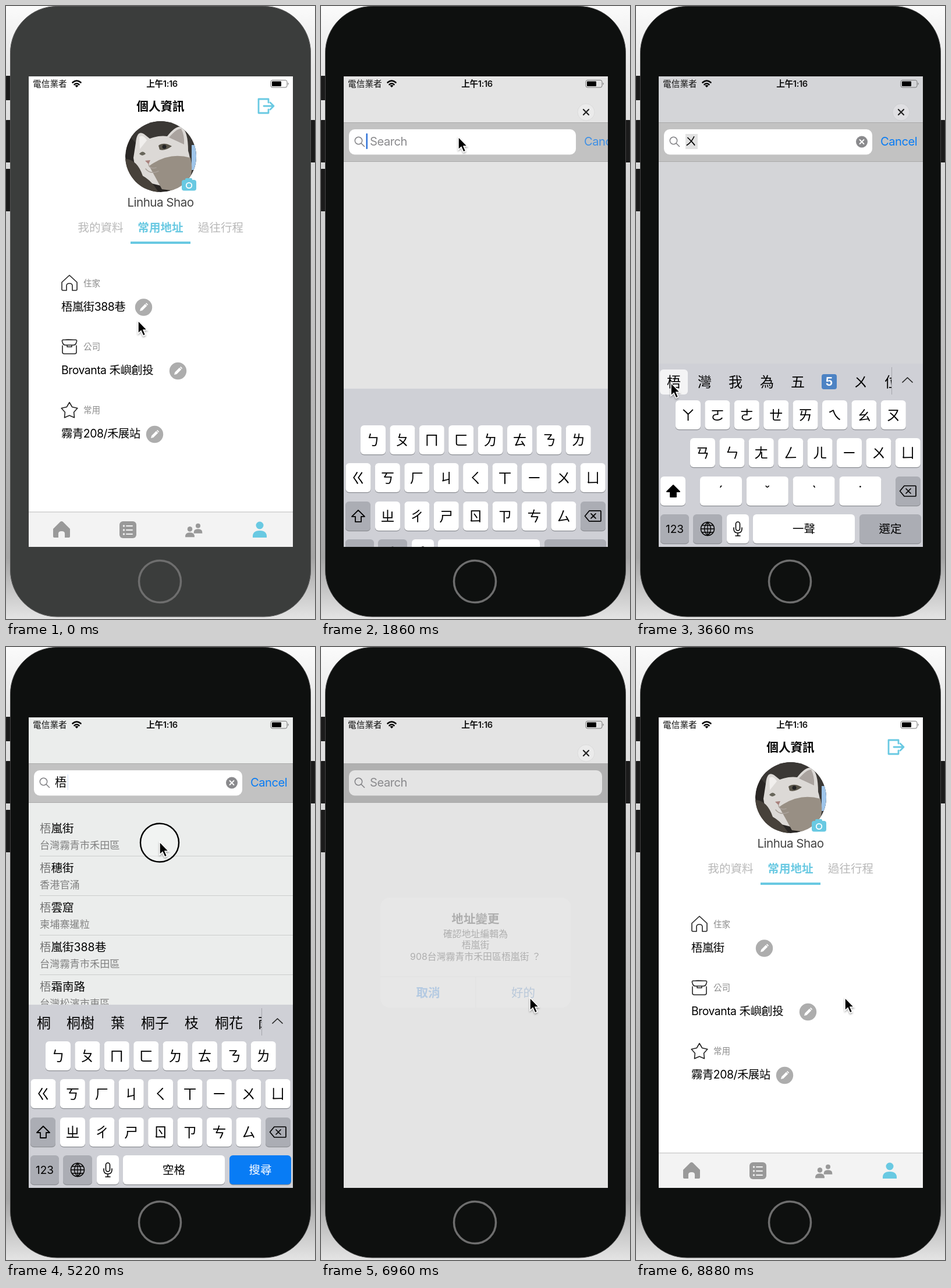
Recreate the animation shown at these times as an HTML page. Size 531 px wide and 1054 px high, loop 8.94 s.

```html
<!DOCTYPE html>
<html lang="zh-Hant">
<head>
<meta charset="utf-8">
<style>
html, body { margin: 0; width: 100%; height: 100%; overflow: hidden; background: #eee; }
svg { display: block; width: 100vw; height: 100vh; }
text { font-family: Inter, "Noto Sans CJK TC", "Noto Sans CJK", sans-serif; white-space: pre; }
.latin { letter-spacing: -.025em; }
</style>
</head>
<body>
<svg id="stage" viewBox="0 0 531 1054" preserveAspectRatio="none"></svg>
<script>
const LOOP = 8940;
const BLUE = '#69c9e2', LINK = '#087cf5';

const rect = (x, y, w, h, fill, r = 0, extra = '') =>
  `<rect x="${x}" y="${y}" width="${w}" height="${h}" rx="${r}" fill="${fill}" ${extra}/>`;
const circle = (x, y, r, fill, extra = '') => `<circle cx="${x}" cy="${y}" r="${r}" fill="${fill}" ${extra}/>`;
const path = (d, stroke, w = 2, fill = 'none', extra = '') =>
  `<path d="${d}" stroke="${stroke}" stroke-width="${w}" fill="${fill}" stroke-linecap="round" stroke-linejoin="round" ${extra}/>`;
const shape = (d, fill, extra = '') => `<path d="${d}" fill="${fill}" ${extra}/>`;
const text = (x, y, s, size, fill = '#000', extra = '') =>
  `<text x="${x}" y="${y}" font-size="${size}" fill="${fill}" ${extra}>${s}</text>`;
const mid = (x, y, s, size, fill, extra = '') => text(x, y, s, size, fill, `text-anchor="middle" ${extra}`);
const group = (id, body, extra = '') => `<g id="${id}" ${extra}>${body}</g>`;

function phone() {
  const side = (x, y, h) => rect(x, y, 10, h, '#1b1b1b', 2);
  return rect(0, 0, 531, 1054, 'url(#backdrop)') +
    side(-1, 120, 42) + side(-1, 196, 73) + side(-1, 280, 73) + side(522, 196, 73) +
    rect(7.5, .5, 516, 1049.5, '#0e100f', 80, 'stroke="#444"') +
    rect(7.5, .5, 516, 1049.5, '#fff', 80, 'id="glare"') +
    circle(264.5, 989.5, 36, 'none', 'stroke="#6e6e6e" stroke-width="3.5"');
}

function statusBar() {
  return text(46, 139, '電信業者', 14.7, '#111') +
    path('M114.5 131.5Q121.5 125.5 128.5 131.5M117.5 135Q121.5 131.5 125.5 135', '#000', 2.6) +
    shape('M118.6 137Q121.5 134.7 124.4 137L121.5 140Z', '#000') +
    mid(268, 139, '上午1:16', 14.7, '#111', 'font-weight="600" class="latin"') +
    rect(455, 127.5, 28, 12.5, 'none', 3, 'stroke="#777"') + rect(457, 129.5, 16, 8.5, '#000', 1) +
    shape('M484.5 131.5Q487 133.7 484.5 136Z', '#777');
}

function avatar() {
  return group('', circle(266, 259, 61, '#292624') +
    shape('M204 215L240 196L300 200L329 235V320H300Z', '#3b3835') +
    shape('M319 239H328V282H319Z', '#9fc5ea') +
    shape('M223 235Q225 213 237 220L247 228Q263 222 277 224Q292 205 302 208Q313 216 313 249Q326 290 302 318L246 304Q222 288 219 261Z', '#dcd9d6') +
    shape('M280 226Q294 210 301 211Q307 222 306 238Z', '#aaa39f') +
    shape('M229 225Q236 220 242 231L230 246Z', '#f1efed') +
    shape('M246 275Q280 250 317 261Q326 295 300 319L268 315Z', '#988f84') +
    shape('M204 263Q225 263 235 292Q250 300 262 320H222Q204 302 204 263Z', '#47413a') +
    shape('M262 240Q271 233 285 241Q273 250 264 247Z', '#5a554a') + circle(272, 242, 3.5, '#222') +
    shape('M229 254Q235 247 240 254Q234 260 229 254Z', '#68665b') +
    shape('M239 266L248 265L245 272Z', '#a8827d') +
    path('M245 272Q246 281 258 278M240 280Q248 290 262 284', '#aaa29b', 1.5), 'clip-path="url(#round)"') +
    rect(302, 299, 25, 18.5, BLUE, 4) + rect(308, 296, 12, 7, BLUE, 2) +
    circle(314.5, 308.5, 4.7, 'none', 'stroke="#fff" stroke-width="1.8"');
}

const pencil = (id, x, y) => group(id, circle(0, 0, 14.7, '#adadad') +
  shape('M-6.5 6.5L-5.3 2.2L2.6 -5.7L5.8 -2.5L-2.2 5.4ZM3.4 -6.5L4.8 -7.5L7.5 -4.8L6.5 -3.3Z', '#fff'),
  `transform="translate(${x} ${y})"`);

function profile() {
  const person = (x, y, k, fill) => `<g transform="translate(${x} ${y}) scale(${k})">` +
    circle(0, -7, 6.5, fill) + shape('M-12 14Q-13 2 0 2Q13 2 12 14Z', fill) + '</g>';
  const dots = [894, 901, 908].map(y =>
    circle(202.5, y, 1.7, '#f2f2f2') + path(`M207 ${y}H217`, '#f2f2f2', 2)).join('');
  const star = Array.from({ length: 10 }, (_, i) => {
    const a = i * Math.PI / 5, r = i % 2 ? 8 : 14.5;
    return `${(109 + r * Math.sin(a)).toFixed(1)} ${(696 - r * Math.cos(a)).toFixed(1)}`;
  }).join('L');
  return rect(39, 121, 454, 809, '#fff') +
    mid(265.5, 179.5, '個人資訊', 20.6, '#000', 'font-weight="700"') +
    path('M451 166V160H434V184H451V178M443 172H460M454 166L460 172L454 178', BLUE, 2.8) +
    avatar() +
    mid(265.5, 345, 'Linhua Shao', 20.6, '#444', 'class="latin"') +
    mid(162.5, 388, '我的資料', 19.6, '#b8b8b8') +
    mid(265.5, 388, '常用地址', 19.6, BLUE, 'font-weight="700"') +
    mid(369, 388, '過往行程', 19.6, '#b8b8b8') + rect(214, 405, 103, 4, BLUE) +
    path('M96 475L109 463L122 475V487Q122 489 120 489H114V481Q114 477 109 477Q104 477 104 481V489H98Q96 489 96 487Z', '#222', 1.6) +
    path('M97 578Q95 574 99 574H119Q123 574 121 578Q120 583 116 583H102Q98 583 97 578ZM102 574Q104 573 116 574M97 584V595Q97 598 100 598H118Q121 598 121 595V584M105 583V586H113V583', '#222', 1.6) +
    path(`M${star}Z`, '#222', 1.6) +
    text(133, 482, '住家', 14.6, '#8c8c8c') + text(133, 591, '公司', 14.6, '#8c8c8c') + text(133, 700, '常用', 14.6, '#8c8c8c') +
    text(95, 524, '', 19.4, '#000', 'id="home" class="latin"') + pencil('homePen', 236, 518) +
    text(95, 633, 'Brovanta 禾嶼創投', 19.4, '#000', 'class="latin"') + pencil('', 295.5, 627.5) +
    text(95, 742, '霧青208/禾展站', 19.4, '#000', 'class="latin"') + pencil('', 255.5, 736.5) +
    rect(39, 870, 454, 60, '#f3f3f3') + rect(39, 869.5, 454, 1, '#b9b9b9') +
    shape('M95.5 886Q97 886 98 887L110 899V912Q110 914 108 914H101V907Q101 903 95.5 903Q90 903 90 907V914H83Q81 914 81 912V899L93 887Q94 886 95.5 886Z', '#999') +
    rect(195, 886, 29, 29, '#999', 6) + dots +
    person(316, 904, .66, '#999') + person(330, 898, .62, '#999') + person(436, 900, 1, BLUE);
}

function results() {
  const rows = [['嵐街', '台灣霧青市禾田區'], ['穗街', '香港官涌'], ['雲窟', '柬埔寨暹粒'],
    ['嵐街388巷', '台灣霧青市禾田區'], ['霜南路', '台灣松濱市東區']];
  return rect(39, 121, 454, 809, '#ebedec') + rows.map(([name, area], i) => {
    const y = 291 + 68 * i;
    return text(58, y + 28, `<tspan fill="#777">梧</tspan>${name}`, 19.5) +
      text(58, y + 56, area, 17.2, '#808080') + rect(58, y + 68, 435, 1, '#cbcdcc');
  }).join('');
}

function searchBar() {
  return rect(39, 200, 454, 68, '#b0b0b0', 0, 'id="band"') +
    rect(39, 200, 454, 1, '#aaa') + rect(39, 267, 454, 1, '#aaa') +
    rect(48, 212, 435, 43.5, '#fff', 10, 'id="field"') +
    circle(64.5, 231.5, 6.2, 'none', 'stroke="#808084" stroke-width="1.5"') + path('M69 236L74.5 241.5', '#808084', 1.6) +
    rect(85, 220, 21, 26, '#e2e2e2', 0, 'id="mark"') +
    text(84, 240, 'Search', 20.2, '#8a8a8d', 'id="query" class="latin"') +
    rect(77.5, 219, 2.5, 27, '#2f72d8', 1, 'id="caret"') +
    group('clear', circle(388, 233.5, 10, '#8a8a8d') + path('M384.5 230L391.5 237M391.5 230L384.5 237', '#fff', 1.8)) +
    text(420, 240, 'Cancel', 20.2, LINK, 'id="cancel" class="latin"');
}

const keyBox = (x, y, w, fill) => rect(x, y + 1.3, w, 50, '#8d8f94', 6) + rect(x, y, w, 50, fill, 6);
const key = (x, y, w, label, fill = '#fff', size = 24, color = '#000') =>
  keyBox(x, y, w, fill) + mid(x + w / 2, y + 25 + size * .36, label, size, color);
const keyRow = (x, y, labels) => [...labels].map((c, i) => key(x + 50.4 * i, y, 43, c)).join('');

function keyboard() {
  const gray = '#abadb4';
  const arrow = fill => path('M64 824L75 835H69V844H59V835H53Z', '#000', 1.8, fill);
  const initials = keyRow(68, 678, 'ㄅㄆㄇㄈㄉㄊㄋㄌ') + keyRow(42.5, 743, 'ㄍㄎㄏㄐㄑㄒㄧㄨㄩ') +
    keyRow(93, 809, 'ㄓㄔㄕㄖㄗㄘㄙ') + keyBox(42, 809, 43, gray) + arrow('none') + key(201, 874, 175, '空格', '#fff', 19.5);
  const tones = [...'ˊˇˋ˙'].map((c, i) => key(110 + 79.8 * i, 809, 72, c)).join('');
  const finals = keyRow(68, 678, 'ㄚㄛㄜㄝㄞㄟㄠㄡ') + keyRow(93, 743, 'ㄢㄣㄤㄥㄦㄧㄨㄩ') + tones +
    keyBox(42, 809, 43, '#fff') + arrow('#000') + key(201, 874, 175, '一聲', '#fff', 19.5) + key(384, 874, 106, '選定', gray, 19.5);
  const words = list => list.map(([x, s]) => mid(x, 655, s, 24)).join('');
  const first = rect(41, 625, 48, 43, '#f4f4f5', 6) + words([[65, '梧'], [118, '灣'], [171, '我'], [225, '為'], [278, '五'], [386, 'ㄨ'], [439, '位']]) +
    rect(319, 633, 26, 26, '#4d83c4', 4) + mid(332, 653, '5', 20, '#fff', 'font-weight="700"');
  const next = words([[65, '桐'], [128, '桐樹'], [192, '葉'], [256, '桐子'], [319, '枝'], [383, '桐花'], [445, '雨']]);
  return rect(39, 615, 454, 330, '#cfd0d6') +
    group('', group('firstWords', first) + group('nextWords', next), 'clip-path="url(#words)"') +
    group('more', rect(439, 621, 1, 47, '#a5a6ac') + path('M458 647L466.5 639L475 647', '#222', 1.7)) +
    group('initials', initials) + group('finals', finals) +
    keyBox(446, 809, 43, gray) +
    path('M461 825H480Q481 825 481 826V842Q481 843 480 843H461L453.5 834ZM464 830L472 838M472 830L464 838', '#000', 1.7) +
    key(42, 874, 49, '123', gray, 19) + keyBox(98, 874, 50, gray) +
    circle(123, 899, 11.5, 'none', 'stroke="#000" stroke-width="1.5"') +
    path('M111.5 899H134.5M123 887.5V910.5M114 893H132M114 905H132M123 887.5Q112 899 123 910.5Q134 899 123 910.5M123 887.5Q134 899 123 910.5', '#000', 1.3) +
    keyBox(156, 874, 38, '#fff') + rect(171.5, 887, 7, 15, 'none', 3.5, 'stroke="#000" stroke-width="1.6"') +
    path('M168 897V899Q168 906 175 906Q182 906 182 899V897M175 906V911M171 911H179', '#000', 1.6) +
    group('searchOff', key(384, 874, 106, '搜尋', gray, 19.5)) +
    group('searchOn', key(384, 874, 106, '搜尋', LINK, 19.5, '#fff'));
}

function alertBox() {
  return rect(102, 431, 327.5, 189, '#f3f3f3', 16) +
    mid(265.5, 474.5, '地址變更', 20.6, '#000', 'font-weight="700"') +
    ['確認地址編輯為', '梧嵐街', '908台灣霧青市禾田區梧嵐街 ？'].map((s, i) => mid(265.5, 498.5 + 19.5 * i, s, 15.9)).join('') +
    rect(102, 566.5, 327.5, 1, '#d9d9d9') + rect(265.5, 567, 1, 53, '#d9d9d9') +
    mid(184, 601.5, '取消', 20.6, '#1976dc', 'font-weight="700"') + mid(347.5, 601.5, '好的', 20.6, '#2f70ba');
}

const stage = document.getElementById('stage');
stage.innerHTML = `<defs>
  <linearGradient id="backdrop" x2="0" y2="1"><stop stop-color="#fbfbfb"/><stop offset=".1" stop-color="#e6e6e6"/>
  <stop offset=".5" stop-color="#c4c4c4"/><stop offset=".9" stop-color="#a5a5a5"/><stop offset="1" stop-color="#e4e4e4"/></linearGradient>
  <clipPath id="screen">${rect(39, 121, 454, 809, '#000')}</clipPath>
  <clipPath id="round">${circle(266, 259, 61, '#000')}</clipPath>
  <clipPath id="words">${rect(39, 615, 400, 60, '#000')}</clipPath>
  <filter id="soft" x="-50%" y="-50%" width="200%" height="200%"><feDropShadow dx="0" dy="2" stdDeviation="1.5" flood-opacity=".35"/></filter>
  </defs>` + phone() + group('', profile() +
  group('modal', rect(39, 121, 454, 809, '#e4e4e4', 0, 'id="page"') +
    circle(455.5, 182.5, 14.5, '#fff', 'fill-opacity=".25" stroke="#000" stroke-opacity=".06"') +
    path('M451 178L460 187M460 178L451 187', '#222', 2.2) +
    group('results', results()) + searchBar() + group('keys', keyboard())) +
  rect(39, 121, 454, 809, '#000', 0, 'id="dim"') + group('alert', alertBox()) + statusBar(), 'clip-path="url(#screen)"') +
  group('ring', circle(0, 0, 33, '#fff', 'fill-opacity=".3" stroke="#000" stroke-width="2.4"')) +
  group('cursor', shape('M0 0V22L5 17.5L8.8 26L12.6 24.3L9 16H15.5Z', '#000', 'stroke="#fff" stroke-width="1.5" filter="url(#soft)"'));

const part = {};
stage.querySelectorAll('[id]').forEach(e => part[e.id] = e);
const set = (id, name, value) => part[id].setAttribute(name, value);
const fade = (id, value) => set(id, 'opacity', value);
const show = (id, on) => fade(id, on ? 1 : 0);
const move = (id, x, y) => set(id, 'transform', `translate(${x} ${y})`);

const ramp = (t, a, b) => Math.min(1, Math.max(0, (t - a) / (b - a)));
const ease = u => (1 - Math.cos(Math.PI * u)) / 2;
const mix = (a, b, u) => a + (b - a) * u;
const spring = ms => { const w = Math.max(0, ms) * .0183; return 1 - (1 + w) * Math.exp(-w); };
const blend = (a, b, u) => `rgb(${a.map((v, i) => Math.round(mix(v, b[i], u)))})`;

// [start, end, x, y] of each pointer move
const MOVES = [[60, 200, 232, 531], [1050, 1260, 240, 208], [1400, 1580, 236, 225], [2290, 2720, 417, 769],
  [3220, 3600, 60, 648], [4880, 5160, 264, 335], [5520, 6100, 345, 522], [6240, 6460, 359, 603]];
const TAPS = [[220, 360], [1600, 1720], [2780, 2900], [3700, 3840], [5160, 5300], [6520, 6640]];

function pointer(t) {
  let x = 227, y = 541;
  for (const [a, b, nx, ny] of MOVES) {
    const u = ease(ramp(t, a, b));
    x = mix(x, nx, u);
    y = mix(y, ny, u);
  }
  return [x, y];
}

function draw(t) {
  const [x, y] = pointer(t);
  move('cursor', x, y);
  move('ring', x, y + 1.5);
  show('ring', TAPS.some(([a, b]) => t >= a && t < b));
  fade('glare', .19 * (1 - ramp(t, 0, 360)));

  const renamed = t > 6700;
  part.home.textContent = renamed ? '梧嵐街' : '梧嵐街388巷';
  move('homePen', renamed ? 220.5 : 236.5, 518);

  move('modal', 0, 809 * (1 - spring(t - 380) + spring(t - 7060)));

  const focus = ease(ramp(t, 1670, 2015)) - ease(ramp(t, 5340, 5640));
  const bright = ramp(t, 1640, 1760) - ramp(t, 5340, 5640);
  const dimmed = ramp(t, 1860, 2060) - ramp(t, 5340, 5500);
  set('page', 'fill', blend([228, 228, 228], [212, 213, 216], dimmed));
  set('band', 'fill', blend([176, 176, 176], [194, 194, 194], bright));
  set('field', 'fill', blend([228, 228, 228], [255, 255, 255], bright));
  set('field', 'width', 435 - 77 * focus);
  set('cancel', 'x', 497 - 77 * focus);
  fade('cancel', Math.min(1, focus * 1.2));

  const composing = t >= 2860 && t < 3780, chosen = t >= 3780 && t < 5340, typed = composing || chosen;
  part.query.textContent = composing ? 'ㄨ' : chosen ? '梧' : 'Search';
  set('query', 'fill', typed ? '#000' : '#8a8a8d');
  show('mark', composing);
  show('clear', typed);
  set('caret', 'x', chosen ? 105 : 77.5);
  fade('caret', composing || t < 1640 || t >= 5340 ? 0 : chosen ? .12 : 1);

  move('keys', 0, 315 * (1 - spring(t - 1670) + spring(t - 5340)));
  show('firstWords', composing);
  show('nextWords', t >= 3780);
  show('more', t >= 2860);
  show('finals', composing);
  show('initials', !composing);
  show('searchOff', t < 2860);
  show('searchOn', t >= 3780);
  fade('results', ramp(t, 4260, 4380) - ramp(t, 5340, 5480));

  const appear = ease(ramp(t, 5700, 5960));
  fade('dim', .355 * (appear - ramp(t, 6680, 6920)));
  fade('alert', appear - ramp(t, 6700, 7040));
  const k = 1.15 - .15 * appear;
  set('alert', 'transform', `translate(${265.5 * (1 - k)} ${525.5 * (1 - k)}) scale(${k})`);
}

const start = performance.now();
function tick() {
  draw((performance.now() - start) % LOOP);
  requestAnimationFrame(tick);
}
tick();
</script>
</body>
</html>
```
